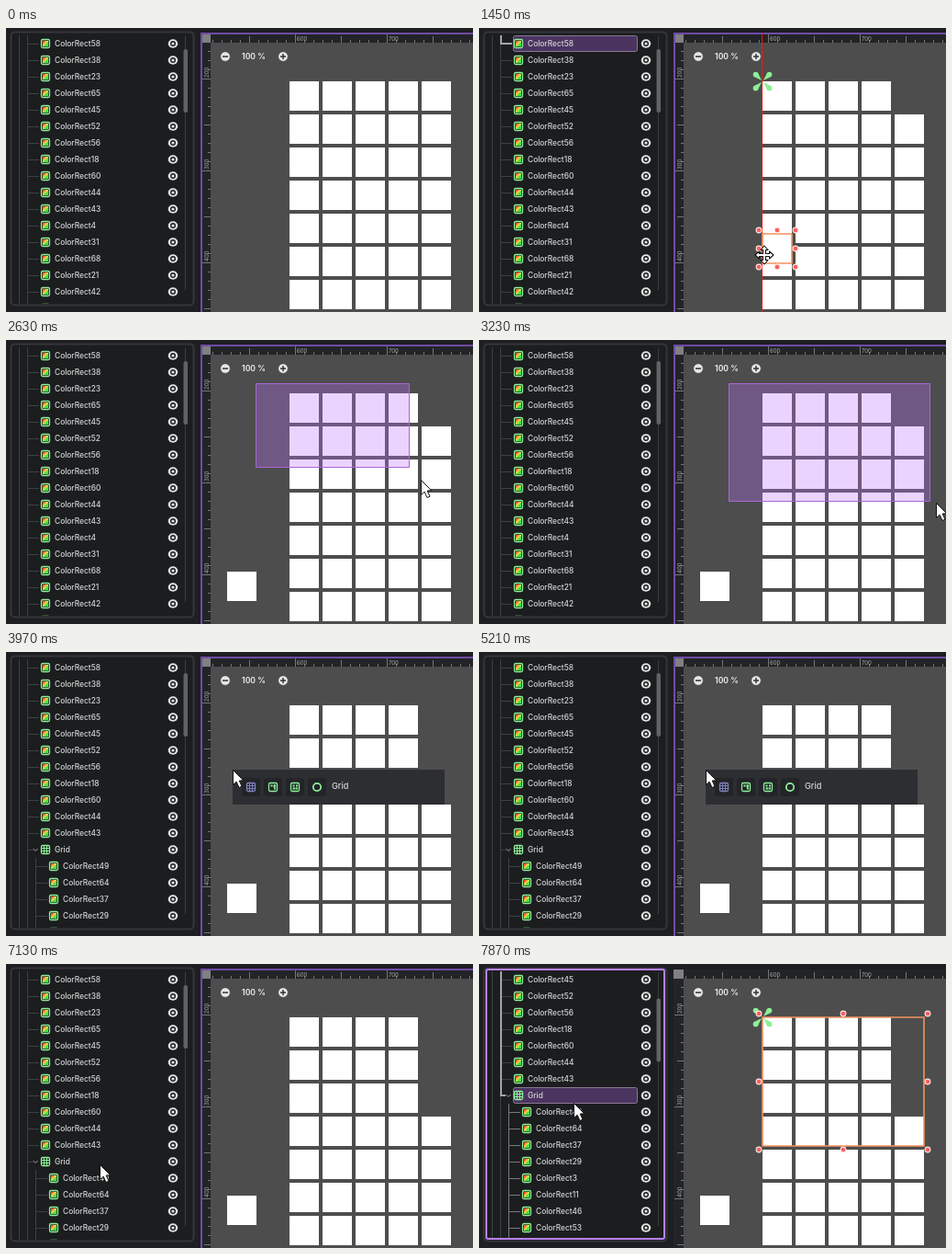
These frames come from a looping animation (509x309 px, 8 s). An HTML page with a canvas:

```html
<!DOCTYPE html>
<html lang="en">
<head>
<meta charset="utf-8">
<title>Grid container editing</title>
<style>
html, body { margin: 0; width: 100%; height: 100%; overflow: hidden; background: #1d1f22; }
canvas { display: block; }
</style>
</head>
<body>
<canvas id="stage" width="509" height="309"></canvas>
<script>
const ctx = document.getElementById('stage').getContext('2d');
const LOOP = 8000, STEP = 120, CELL = 32, PITCH = 36, LEFT = 309, TOP = 58;
const GREEN = '#8eef97', ORANGE = '#f2935f', PURPLE = '#724aa8', RED = '#f0190f';
const LINE = '#3e4144', BRIGHT_LINE = '#a3a5a6';

const at = {
  appear: 120, grab: 850, drag: 970, drop: 1690, deselect: 2390, marquee: 2510, release: 3350,
  group: 3970, closePopup: 6200, focusTree: 7270, scroll: 7390
};

// Pointer moves: start, duration, x, y and an ease-out power for each axis
const moves = [
  [240, 480, 459, 74], [at.drag, 840, 252, 269, 1, 1.74], [1810, 600, 272, 47],
  [at.marquee, 120, 440, 139], [2630, 720, 498, 177, 1.3, 2.3], [at.release, 240, 223, 116],
  [3720, 120, 247, 128], [5830, 240, 249, 125], [6430, 360, 365, 165], [6790, 360, 102, 218],
  [at.scroll, 600, 103, 151]
];

const inGrid = i => [i % 4, i >> 2];
const inColumns = i => [i >> 2, i % 4];
const inRows = i => [i % 5, i / 5 | 0];
const unsorted = i => i < 4 ? [i, 0] : inRows(i + 1);
const modes = [
  { from: at.group, name: 'Grid', icon: 0, place: inGrid },
  { from: 4470, name: 'Flow', icon: 1, place: inColumns },
  { from: 4720, name: 'Flow', icon: 2, place: inRows },
  { from: 4840, name: 'Control', icon: 3, place: unsorted },
  { from: 5210, name: 'Grid', icon: 0, place: inGrid }
];

const colorRects = list => list.split(' ').map(n => ({ label: 'ColorRect' + n }));
const topRows = colorRects('58 38 23 65 45 52 56 18 60 44 43');
const looseRows = colorRects('4 31 68 21 42 7');
const groupRows = colorRects('49 64 37 29 3 11 46 53 16').map(row => ({ ...row, indent: 9 }));

// The screen updates in steps, so progress does too
function progress(t, start, duration) {
  if (t < start) return 0;
  return Math.min(1, (Math.floor((t - start) / STEP) + 1) * STEP / duration);
}

const easeOut = (u, power) => 1 - (1 - u) ** power;
const mix = (a, b, u) => Math.round(a + (b - a) * u);

function pointerAt(t) {
  let x = 469, y = 246;
  for (const [start, duration, toX, toY, powerX = 1, powerY = 1] of moves) {
    const u = progress(t, start, duration);
    x = mix(x, toX, easeOut(u, powerX));
    y = mix(y, toY, easeOut(u, powerY));
  }
  return [x, y];
}

function looseCellAt(t) {
  const u = progress(t, at.drag, 840);
  const x = mix(453, 241, u), y = mix(TOP, 252, easeOut(u, 1.55));
  const snapped = Math.abs(x - LEFT) < 20;
  return { x: snapped ? LEFT : x, y, snapped };
}

function rect(x, y, w, h, color) {
  ctx.fillStyle = color;
  ctx.fillRect(x, y, w, h);
}

function paint(fill, stroke, width) {
  if (fill) { ctx.fillStyle = fill; ctx.fill(); }
  if (stroke) { ctx.strokeStyle = stroke; ctx.lineWidth = width; ctx.stroke(); }
}

function box(x, y, w, h, r, fill, stroke, width = 1) {
  ctx.beginPath();
  ctx.roundRect(x, y, w, h, r);
  paint(fill, stroke, width);
}

function circle(x, y, r, fill, stroke, width = 1) {
  ctx.beginPath();
  ctx.arc(x, y, r, 0, 7);
  paint(fill, stroke, width);
}

function poly(points, fill, stroke, width = 1) {
  ctx.beginPath();
  points.forEach(p => ctx.lineTo(...p));
  if (fill) ctx.closePath();
  paint(fill, stroke, width);
}

function text(string, x, y, size = 8.4, color = '#d6d6d6', weight = 500) {
  ctx.font = `${weight} ${size}px Inter, sans-serif`;
  ctx.fillStyle = color;
  ctx.fillText(string, x, y);
}

function colorIcon(x, y) {
  const fill = ctx.createLinearGradient(x - 3, y - 3, x + 3, y + 3);
  fill.addColorStop(.15, '#ff4a3d');
  fill.addColorStop(.45, '#ffd83d');
  fill.addColorStop(.65, '#45e04f');
  box(x - 4.5, y - 4.5, 9, 9, 1.5, '#1c3a1f', GREEN, 1.3);
  rect(x - 3, y - 3, 6, 6, fill);
}

function containerIcon(kind, x, y, color) {
  if (kind === 3) return circle(x, y, 4.2, null, color, 1.8);
  box(x - 4.5, y - 4.5, 9, 9, 1.5, null, color, 1.3);
  for (const d of [-1.5, 1.5]) {
    if (kind === 0) {
      rect(x + d - .5, y - 4, 1, 8, color);
      rect(x - 4, y + d - .5, 8, 1, color);
    } else {
      const length = d < 0 ? 2 : 3;
      if (kind === 1) rect(x + d - 1, y - 2.5, 2, length, color);
      else rect(x - 2.5, y + d - 1, length, 2, color);
      rect(x + 1, y + d - 1, 2, 2, color);
    }
  }
}

function eye(y) {
  ctx.beginPath();
  ctx.ellipse(182, y, 5.3, 4.7, 0, 0, 7);
  paint('#e4e4e4');
  circle(182, y, 3, '#1b1d1f');
  circle(182, y, 1.6, '#e4e4e4');
}

function drawRow({ label, indent = 0, icon }, y, selected, focused) {
  const x = 43 + indent, isGroup = icon !== undefined, branch = isGroup ? 6 : 13;
  const lineColor = indent && focused ? '#77797b' : LINE;
  if (indent) rect(32, y - 9, 1, 18, lineColor);
  rect(23 + indent, y, branch, 1, lineColor);
  if (selected) {
    rect(23, 8, 2, y - 7, BRIGHT_LINE);
    rect(23, y - 1, branch, 2, BRIGHT_LINE);
    box(37.5, y - 8.5, 135, 17, 2, '#4b3460', '#88798f');
  }
  if (isGroup) {
    poly([[29.5, y - 1], [32, y + 1.5], [34.5, y - 1]], null, '#a0a2a3');
    containerIcon(icon, x, y, GREEN);
  } else colorIcon(x, y);
  text(label, x + 10, y + 3);
  eye(y);
}

function drawTree(t, mode) {
  const focused = t >= at.focusTree, rectSelected = t >= at.grab && t < at.deselect;
  const scroll = Math.round(72 * progress(t, at.scroll, 600));
  const rows = mode ? [...topRows, { label: mode.name, icon: mode.icon }, ...groupRows] : [...topRows, ...looseRows];
  box(5.5, 4.5, 199, 297, 4, '#1b1d1f', '#34373a', 2);
  ctx.save();
  ctx.beginPath();
  ctx.rect(8, 8, 185, 292);
  ctx.clip();
  rect(14, 8, 1, 292, LINE);
  rect(23, 8, 1, 292, LINE);
  rows.forEach((row, i) => {
    const selected = i === 0 ? rectSelected : focused && row.icon !== undefined;
    drawRow(row, 17 + i * 18 - scroll, selected, focused);
  });
  if (t >= at.release && t < at.group) rect(23, 8, 2, 292, BRIGHT_LINE);
  ctx.restore();
  rect(195, 9, 1, 276, '#3a3c3f');
  box(193.5, 23 + scroll / 5, 4.5, 69, 2, '#606264');
  if (focused) box(8, 6, 194, 293, 2, null, '#b981f5', 2);
}

function drawRulers() {
  rect(212, 6, 297, 10, '#222427');
  rect(212, 6, 11, 303, '#222427');
  for (let i = -9; i < 30; i++) {
    const length = i % 10 === 0 ? 10 : i % 5 === 0 ? 7 : 3;
    const x = 315 + i * 10, y = 55 + i * 10;
    if (x > 223) rect(x, 16 - length, 1, length, '#74767a');
    if (y > 16) rect(223 - length, y, length, 1, '#74767a');
  }
  for (let k = 0; k < 3; k++) {
    text(600 + k * 100, 317 + k * 100, 14, 6, '#a8a8a8', 400);
    ctx.save();
    ctx.translate(221, 54 + k * 100);
    ctx.rotate(-Math.PI / 2);
    text(200 + k * 100, 0, 0, 6, '#a8a8a8', 400);
    ctx.restore();
  }
  rect(212, 6, 11, 10, '#808080');
}

function outline(x, y, w, h) {
  box(x, y, w, h, 0, null, ORANGE, 1.6);
}

function drawSelection(x, y, w, h) {
  for (const sx of [-1, 1]) for (const sy of [-1, 1]) {
    const spot = (a, b) => [LEFT + sx * a, TOP + sy * b];
    poly([spot(1, 1), spot(5, 9), spot(9, 5)], GREEN);
    circle(...spot(7.4, 7.4), 2.9, GREEN);
  }
  outline(x, y, w, h);
  for (const i of [0, .5, 1]) for (const j of [0, .5, 1]) {
    if (i === .5 && j === .5) continue;
    circle(x - 4 + (w + 8) * i, y - 4 + (h + 8) * j, 2.9, '#f8605f', '#ffe2df', 1.1);
  }
}

function zoomButton(x, plus) {
  circle(x, 31, 5.3, '#e6e6e6', '#3c3c3c', .6);
  rect(x - 3, 30.3, 6, 1.5, '#333');
  if (plus) rect(x - .75, 28, 1.5, 6, '#333');
}

function drawCanvas(t, mode) {
  rect(212, 6, 297, 303, '#4d4d4d');
  const cell = ([column, row], draw) => draw(LEFT + column * PITCH, TOP + row * PITCH, CELL, CELL, '#fff');
  const place = mode ? mode.place : unsorted;
  for (let i = 15; i < 35; i++) cell(inRows(i), rect);
  for (let i = 0; i < 14; i++) {
    cell(place(i), rect);
    if (t >= at.release && t < at.group) cell(place(i), outline);
  }
  const { x, y, snapped } = looseCellAt(t);
  rect(x, y, CELL, CELL, '#fff');
  drawRulers();
  if (t < at.focusTree) {
    rect(212, 5, 297, 2, PURPLE);
    rect(212, 5, 2, 304, PURPLE);
  }
  if (snapped) rect(308, 6, 1, 303, RED);
  if (t >= at.grab && t < at.deselect) drawSelection(x, y, CELL, CELL);
  if (t >= at.focusTree) drawSelection(LEFT, TOP, 176, 140);

  // The marquee trails the pointer by one step
  if (t >= at.marquee + STEP && t < at.release) {
    const [mx, my] = pointerAt(t - STEP);
    box(272.5, 47.5, mx - 273, my - 48, 0, 'rgba(191,112,255,.31)', '#a768d6');
  }
  zoomButton(239, false);
  zoomButton(302, true);
  text('100 %', 257, 33.5, 8.6, '#f2f2f2', 600);
}

function drawPopup(mode) {
  rect(247, 128, 231, 38, '#2d2e32');
  for (let i = 0; i < 4; i++) {
    const x = 267 + i * 24;
    box(x - 10, 137, 20, 20, 3, '#222428');
    containerIcon(i, x, 147, i === mode.icon ? '#8080bd' : GREEN);
  }
  text(mode.name, 355, 149, 9.2);
}

function drawPointer(t) {
  ctx.save();
  ctx.translate(...pointerAt(t));
  ctx.lineJoin = 'round';
  if (t >= at.grab && t < at.drop + STEP) {
    const arm = [[-1.5, -1.5], [-1.5, -5.5], [-4, -5.5], [0, -10], [4, -5.5], [1.5, -5.5]];
    const turn = ([x, y], k) => [[x, y], [-y, x], [-x, -y], [y, -x]][k];
    poly([0, 1, 2, 3].flatMap(k => arm.map(p => turn(p, k))), '#fff', '#111', 1.1);
  } else {
    poly([[.5, .5], [.5, 16.5], [4.2, 13.2], [7, 19.5], [10, 18.2], [7.2, 12], [11.8, 11.8]], '#fff', '#111');
  }
  ctx.restore();
}

const start = performance.now();

function frame() {
  const t = (performance.now() - start) % LOOP;
  const mode = modes.findLast(m => m.from <= t);
  rect(0, 0, 509, 309, '#1d1f22');
  drawTree(t, mode);
  drawCanvas(t, mode);
  if (mode && t < at.closePopup) drawPopup(mode);
  if (t >= at.appear) drawPointer(t);
  requestAnimationFrame(frame);
}

frame();
</script>
</body>
</html>
```
